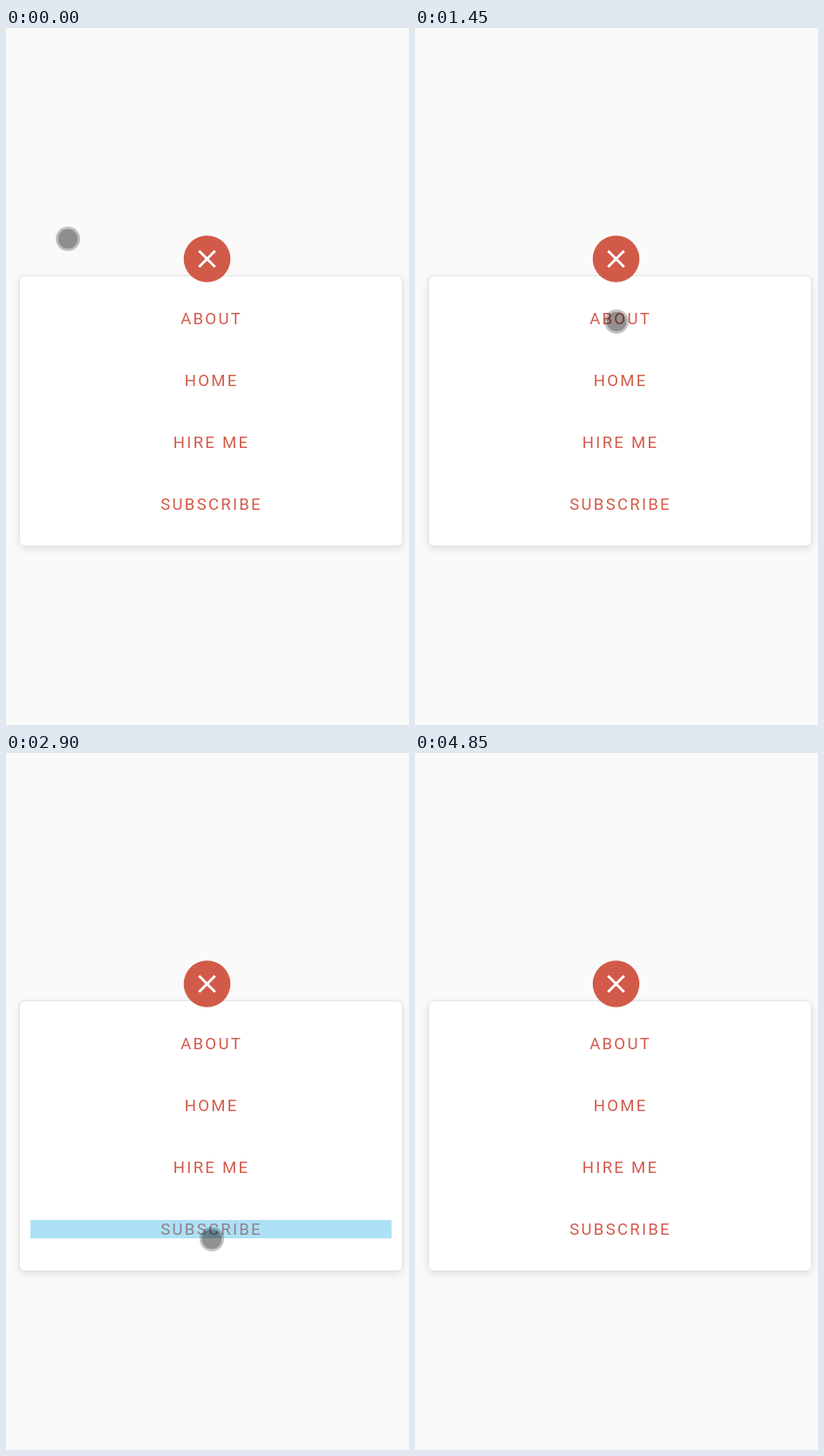
An HTML page for the animation above (4900 ms loop, 462 px wide and 800 px high).

```html
<!DOCTYPE html>
<html lang="en">
<head>
<meta charset="utf-8">
<title>Menu</title>
<style>
  html, body { margin: 0; width: 100%; height: 100%; overflow: hidden; background: #fafafa; }
  svg { display: block; width: 462px; height: 800px; }
  text { font: 18.5px Roboto, sans-serif; letter-spacing: 2.3px; text-anchor: middle; fill: #d25949; }
  .card { fill: #fff; stroke: #e2e2e2; filter: drop-shadow(0 3px 5px rgba(0, 0, 0, .1)); }
  .tap { fill: #33b5e5; }
</style>
</head>
<body>
<svg viewBox="0 0 462 800">
  <g id="menu">
    <rect class="card" x="15.5" y="284.5" width="439" height="310" rx="6"/>
    <text x="235.6" y="340.4">ABOUT</text>
    <text x="235.6" y="411.4">HOME</text>
    <text x="235.6" y="482.4">HIRE ME</text>
    <text x="235.6" y="553.4">SUBSCRIBE</text>
  </g>
  <circle cx="230.5" cy="265" r="26.8" fill="#d25a49"/>
  <path id="icon" d="M-13 0H13M0-13V13" stroke="#fff" stroke-width="3"/>
  <rect id="rowTap" class="tap" x="28" width="414" height="21"/>
  <rect id="buttonTap" class="tap" x="204" y="238" width="53" height="54" rx="2"/>
  <g id="cursor">
    <circle r="14" opacity=".23"/>
    <circle r="11.3" opacity=".26"/>
  </g>
</svg>
<script>
const LOOP = 4900;
const [menu, icon, rowTap, buttonTap, cursor] =
  ['menu', 'icon', 'rowTap', 'buttonTap', 'cursor'].map(id => document.getElementById(id));

// time, x, y of the pointer
const path = [
  [0, 71, 242], [430, 233, 268], [500, 233, 268], [1080, 231, 260],
  [1400, 231, 337], [1640, 231, 337], [1920, 228, 412], [2100, 228, 412],
  [2350, 232, 484], [2530, 232, 484], [2750, 236, 558], [2950, 236, 558],
  [3280, 237, 265], [4130, 237, 265], [4420, 237, -20], [LOOP, 237, -20]
];
const toggles = [463, 800, 3535, 3900];
const rowTaps = [1500, 1970, 2430, 2830];

const clamp = v => Math.min(1, Math.max(0, v));
const bezier = (s, a, b) => 3 * s * (1 - s) ** 2 * a + 3 * s * s * (1 - s) * b + s ** 3;

// CSS "ease": cubic-bezier(.25, .1, .25, 1)
function ease(x) {
  x = clamp(x);
  let lo = 0, hi = 1;
  for (let i = 0; i < 20; i++) {
    const mid = (lo + hi) / 2;
    if (bezier(mid, .25, .25) < x) lo = mid; else hi = mid;
  }
  return bezier(lo, .1, 1);
}

// 1 when open, 0 when closed
const openness = (t, delay, duration) => toggles.reduce(
  (sum, start, i) => sum + (i % 2 ? 1 : -1) * ease((t - start - delay) / duration), 1);

function pointer(t) {
  const i = path.findIndex(p => p[0] > t);
  const [t0, x0, y0] = path[i - 1], [t1, x1, y1] = path[i];
  const u = (t - t0) / (t1 - t0), s = u * u * (3 - 2 * u);
  return [x0 + (x1 - x0) * s, y0 + (y1 - y0) * s];
}

const flash = (t, start, hold, fade) =>
  t < start ? 0 : .4 * clamp((start + hold + fade - t) / fade);

const set = (el, name, value) => el.setAttribute(name, value);

function draw(now) {
  const t = now % LOOP;
  const open = openness(t, 0, 300);
  set(menu, 'opacity', clamp(open));
  set(menu, 'transform', `translate(0 ${-30 * (1 - open)})`);
  set(icon, 'transform', `translate(230.5 265) rotate(${135 * openness(t, -12, 200)})`);

  const row = Math.max(0, rowTaps.findLastIndex(start => t >= start));
  set(rowTap, 'y', 323 + 71 * row);
  set(rowTap, 'opacity', flash(t, rowTaps[row], 110, 50));
  set(buttonTap, 'opacity', Math.max(...toggles.map(start => flash(t, start - 50, 27, 80))));

  set(cursor, 'transform', `translate(${pointer(t)})`);
  requestAnimationFrame(draw);
}
draw(0);
</script>
</body>
</html>
```
